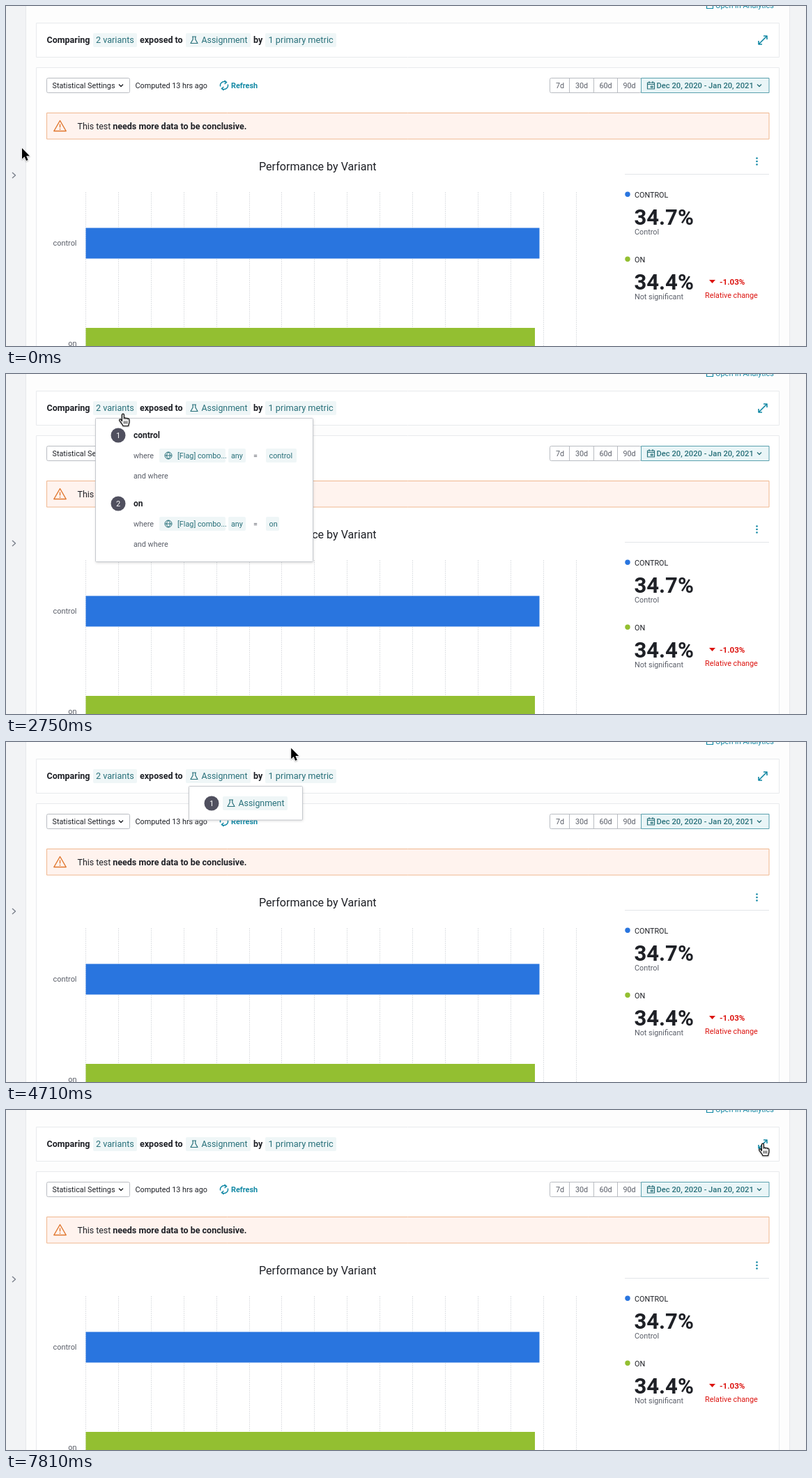
An HTML page with a canvas that plays this animation: 1148 by 488 pixels, repeating every 8000 ms.

```html
<!DOCTYPE html>
<html lang="en">
<head>
<meta charset="utf-8">
<style>
html, body { margin: 0; width: 100%; height: 100%; overflow: hidden; background: #fdfdfd; }
canvas { display: block; }
</style>
</head>
<body>
<canvas id="stage" width="1148" height="488"></canvas>
<script>
const ctx = document.getElementById('stage').getContext('2d');
const LOOP = 8000;
const INK = '#1e2026', GREY = '#5a5e68', TEAL = '#1389a5', DEEP = '#28707a', CHIP = '#eff6f7', RED = '#dc1410';

function text(str, x, y, size, color = INK, weight = 400, align = 'left') {
  ctx.font = `${weight} ${size}px Roboto, sans-serif`;
  ctx.fillStyle = color;
  ctx.textAlign = align;
  ctx.fillText(str, x, y);
}

function box(x, y, w, h, fill, stroke, radius = 0) {
  ctx.beginPath();
  ctx.roundRect(x, y, w, h, radius);
  if (fill) { ctx.fillStyle = fill; ctx.fill(); }
  if (stroke) { ctx.strokeStyle = stroke; ctx.lineWidth = 1; ctx.stroke(); }
}

function dot(x, y, r, color) {
  ctx.beginPath();
  ctx.arc(x, y, r, 0, 7);
  ctx.fillStyle = color;
  ctx.fill();
}

// SVG path drawn relative to (x, y)
function shape(d, x, y, stroke, width = 1.3, fill) {
  const path = new Path2D(d);
  ctx.save();
  ctx.translate(x, y);
  if (fill) { ctx.fillStyle = fill; ctx.fill(path); }
  if (stroke) {
    ctx.strokeStyle = stroke;
    ctx.lineWidth = width;
    ctx.lineJoin = 'round';
    ctx.stroke(path);
  }
  ctx.restore();
}

function chip(str, x, y, w, textX, size = 12.6) {
  box(x, y - 10, w, 20, CHIP, null, 2);
  text(str, textX, y + 4.4, size, DEEP);
}

function flaskChip(x, y) {
  chip('Assignment', x, y, 93, x + 22.5, 12.4);
  shape('M-3-5H3M-1.8-5V-1L-5 4.5H5L1.8-1V-5', x + 12, y, DEEP, 1.2);
}

function badge(n, x, y) {
  dot(x, y, 10.5, '#50505f');
  text(n, x, y + 4, 11, '#fff', 400, 'center');
}

const chevron = (x, y, color) => shape('M-3-1.5L0 1.5 3-1.5', x, y, color);

function drawHeader() {
  box(43.5, 24.5, 1066, 49, '#fff', '#e8eaed');
  text('Comparing', 58.5, 53.4, 12.5, INK, 600);
  chip('2 variants', 125, 49, 63, 129);
  text('exposed to', 192, 53.4, 12.5, INK, 600);
  flaskChip(258, 49);
  text('by', 355, 53.4, 12.5, INK, 600);
  chip('1 primary metric', 372, 49, 102, 376.5, 12.8);
  shape('M-6 6L6-6M1-6H6V-1M-6 1V6H-1', 1086, 49, TEAL, 1.6);
  text('Open in Analytics', 1018, 3, 10.9, TEAL);
  shape('M0-4V3.5H9V-1', 1005.5, 0, TEAL, 1.2);
}

function drawToolbar() {
  box(58.5, 103.5, 119, 21, '#fff', '#b9bcc2', 2);
  text('Statistical Settings', 66.5, 118, 10.8);
  chevron(165, 114, INK);
  text('Computed 13 hrs ago', 185.5, 118, 10.8);
  shape('M-5.3 1.5A5.5 5.5 0 0 1 3-4.6M5.3-1.5A5.5 5.5 0 0 1-3 4.6M.5-7L3.6-4.5 .6-2M-.5 7L-3.6 4.5-.6 2', 313, 114, TEAL, 1.5);
  text('Refresh', 323, 118, 10.9, TEAL, 600);

  box(780.5, 103.5, 131, 21, '#fff', '#b9bcc2', 2);
  for (const x of [808.5, 843.5, 877.5]) shape('M0 0V21', x, 103.5, '#b9bcc2', 1);
  [['7d', 795], ['30d', 826], ['60d', 860.5], ['90d', 894.5]].forEach(([s, x]) => text(s, x, 118, 10.8, GREY, 400, 'center'));
  box(911.5, 103.5, 183.5, 21, '#e9f5f7', '#5aa0ad');
  shape('M-5-4H5V5H-5ZM-5-1.5H5M-2.5-6V-3M2.5-6V-3M0 1H2.5V3H0Z', 925.5, 114, DEEP, 1.2);
  text('Dec 20, 2020 - Jan 20, 2021', 933.5, 118, 11.2, DEEP, 500);
  chevron(1081, 114, DEEP);

  box(58.5, 153.5, 1036.5, 37.5, '#fff3ee', '#f0b78f');
  shape('M0-7.5L8.7 7.5H-8.7ZM0-2.5V2.5M0 4V5.5', 77.5, 172, '#e0752c', 1.4);
  text('This test', 102.5, 176.5, 12.4);
  text('needs more data to be conclusive.', 153.3, 176.5, 12.5, INK, 600);
}

function drawChart() {
  text('Performance by Variant', 363, 235.5, 16.1);
  ctx.setLineDash([2, 1]);
  for (let i = 0; i < 16; i++) shape('M0 0V221', Math.round(114 + i * 46.9) + 0.5, 267, '#dfe1e4', 1);
  ctx.setLineDash([]);
  box(114.5, 318.5, 651, 44, '#2975df');
  box(114.5, 462, 644.5, 26, '#93bf31');
  text('control', 101.5, 344, 10.9, GREY, 400, 'right');
  text('on', 101.5, 488, 10.9, GREY, 400, 'right');
}

function drawSummary() {
  for (const y of [218.5, 223, 227.5]) dot(1077.5, y, 1.3, TEAL);
  shape('M0 0H207', 888, 241.5, '#e3e5e8', 1);
  const stat = (name, value, note, y, color) => {
    dot(892, y, 3.7, color);
    text(name, 902, y + 4.3, 10.8);
    text(value, 901.5, y + 43.5, 31, INK, 600);
    text(note, 902, y + 57.3, 10.8, GREY);
  };
  stat('CONTROL', '34.7%', 'Control', 270.3, '#2975df');
  stat('ON', '34.4%', 'Not significant', 363.3, '#93bf31');
  shape('M-4.5-2.5H4.5L0 2.5Z', 1013.5, 395.5, null, 0, RED);
  text('-1.03%', 1024, 399.5, 11.6, RED, 600);
  text('Relative change', 1003, 418.5, 10.8, RED);
}

function drawPage() {
  box(0, 0, 1148, 488, '#fdfdfd');
  box(0, 0, 28, 488, '#f2f3f5');
  box(1125, 0, 23, 488, '#f2f3f5');
  for (const x of [28.5, 1124.5]) shape('M0 0V488', x, 0, '#e6e8eb', 1);
  shape('M-2-4L2.5 0-2 4', 11, 243, '#7b808b', 1.4);
  box(43.5, 88.5, 1066, 420, '#fff', '#e8eaed');
  drawHeader();
  drawToolbar();
  drawChart();
  drawSummary();
}

function variantRows(n, name, y) {
  badge(n, 161, y);
  text(name, 183, y + 4.4, 12, INK, 600);
  text('where', 183, y + 33, 10.8, GREY);
  chip('[Flag] combo...', 220, y + 29, 95, 246, 10.8);
  shape('M-5 0A5 5 0 1 1 5 0A5 5 0 1 1-5 0ZM-5 0H5M0-5Q-5 0 0 5Q5 0 0-5', 233, y + 29, DEEP, 1);
  chip('any', 319, y + 29, 25, 323, 10.8);
  text('=', 355, y + 33, 10.8, GREY);
  chip(name, 373, y + 29, name.length * 5 + 9, 377.5, 10.8);
  text('and where', 183, y + 62, 10.8, GREY);
}

const popups = [
  { x: 128.5, w: 312, h: 206, show: [1966, 2210], hide: [2860, 3010], draw() {
    variantRows('1', 'control', 88);
    variantRows('2', 'on', 186);
  } },
  { x: 262.5, w: 163, h: 48.5, show: [3620, 3840], hide: [4780, 4950], draw() {
    badge('1', 295, 88);
    flaskChip(311, 88);
  } },
  { x: 375.5, w: 535, h: 44.5, show: [5440, 5590], hide: [6170, 6320], draw() {
    badge('1', 408, 85.5);
    chip('Unique conversions per user of charts: create new chart *', 422, 85.5, 327, 425.5);
    text('will', 754, 89.5, 10.8, GREY);
    chip('Increase', 776, 85.5, 55, 779);
    text('by', 836, 89.5, 10.8, GREY);
    box(853, 74, 49, 23, CHIP, null, 2);
    text('2', 877.5, 90, 12.6, DEEP, 400, 'center');
  } }
];

const clamp = v => Math.max(0, Math.min(1, v));
const ramp = (t, [a, b]) => clamp((t - a) / (b - a));

function drawPopup(p, t) {
  const k = ramp(t, p.show) - ramp(t, p.hide);
  if (k <= 0) return;
  ctx.save();
  ctx.globalAlpha = k;
  ctx.translate(0, 20 * (1 - k));
  ctx.shadowColor = 'rgba(0,0,0,.16)';
  ctx.shadowBlur = 4;
  ctx.shadowOffsetY = 1;
  box(p.x, 63.5, p.w, p.h, '#fff');
  ctx.shadowColor = 'transparent';
  box(p.x, 63.5, p.w, p.h, null, '#c6c9ce', 1);
  p.draw();
  ctx.restore();
}

// start, end, then a quadratic curve: from, control, to
const moves = [
  [0, 1, 23, 204, 23, 204, 23, 204],
  [60, 61, 18, 200, 18, 200, 18, 200],
  [950, 1750, 18, 200, 100, 120, 168, 57],
  [2750, 3380, 168, 57, 250, -24, 320, 42],
  [3380, 3600, 320, 42, 321, 43, 321, 44],
  [4430, 5110, 321, 44, 473, -31, 446, 42],
  [6070, 6580, 446, 42, 600, -9, 759, 29],
  [6880, 7180, 759, 29, 880, 20, 1002, 30],
  [7410, 7810, 1002, 30, 1040, 24, 1086, 48]
];

function pointer(t) {
  const [start, end, x0, y0, cx, cy, x1, y1] = moves.findLast(m => t >= m[0]);
  const u = ramp(t, [start, end]), s = u * u * (3 - 2 * u);
  const curve = (a, c, b) => a * (1 - s) ** 2 + 2 * c * s * (1 - s) + b * s * s;
  return [curve(x0, cx, x1), curve(y0, cy, y1)];
}

const ARROW = 'M0 0V15.5L3.6 12.2 6 18 8.6 17 6.2 11.3H11Z';
const HAND = 'M-1.6 10.5V1.7a1.5 1.5 0 0 1 3 0V7c0-1.6 2.6-1.5 2.7.2 .3-1.4 2.5-1.2 2.6.4 .4-1 2.2-.8 2.2.9V12c0 2-1 2.6-1.2 5.5H0C-.6 15-3.6 12.5-5.2 9.8c-.8-1.6 1.2-2.6 2.2-1.4Z';

function drawPointer(t) {
  const [x, y] = pointer(t);
  const inside = (l, top, r, b) => x > l && x < r && y > top && y < b;
  ctx.save();
  ctx.shadowColor = 'rgba(0,0,0,.3)';
  ctx.shadowBlur = 2;
  ctx.shadowOffsetY = 1;
  if (inside(44, 24, 1110, 74) || inside(58, 103, 178, 125)) {
    shape(HAND, x, y, '#111', 1.2, '#fff');
    ctx.shadowColor = 'transparent';
    shape('M1.5 10.5V14.5M3.6 10.5V14.5M5.7 10.5V14.5', x, y, '#111', 0.9);
  } else {
    shape(ARROW, x, y, '#fff', 1.6);
    ctx.shadowColor = 'transparent';
    shape(ARROW, x, y, null, 0, '#000');
  }
  ctx.restore();
}

function frame() {
  const t = performance.now() % LOOP;
  drawPage();
  popups.forEach(p => drawPopup(p, t));
  drawPointer(t);
  requestAnimationFrame(frame);
}
frame();
</script>
</body>
</html>
```
